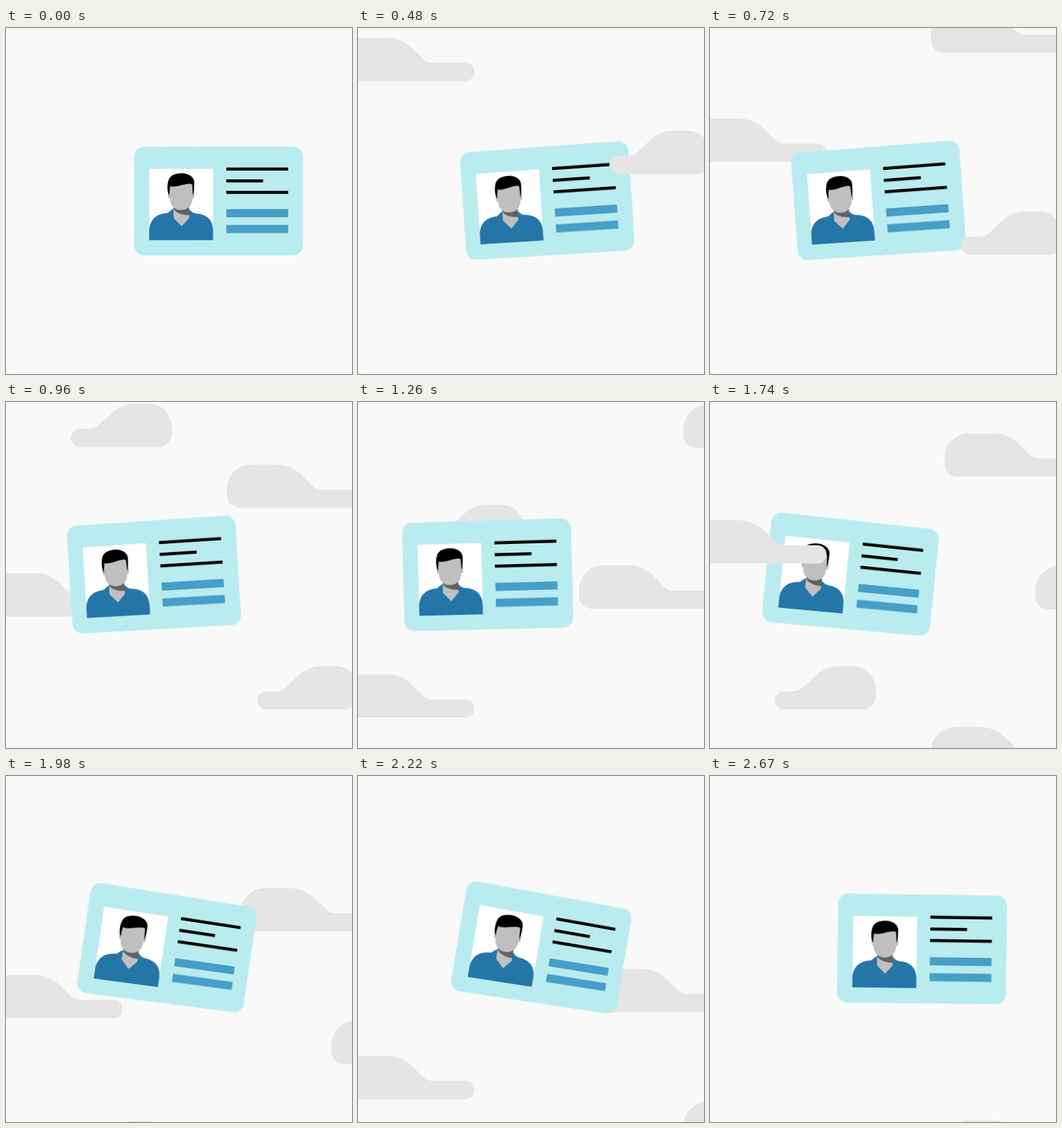
Recreate the animation shown at these times as an HTML page. Size 512x512 px, loop 2700 ms.

```html
<!DOCTYPE html>
<html lang="en">
<head>
<meta charset="utf-8">
<title>Floating ID card</title>
<style>
  html, body { margin: 0; width: 100%; height: 100%; overflow: hidden; background: #f9f9f9; }
  #stage { position: relative; width: 100%; height: 100%; overflow: clip; contain: strict; }
  svg { position: absolute; left: 0; top: 0; width: 100%; height: 100%; }
  #card { transform-origin: 314.5px 256px; }
</style>
</head>
<body>
<div id="stage">
  <svg id="back" viewBox="0 0 512 512" fill="#e5e5e5"></svg>

  <svg id="card" viewBox="0 0 512 512">
    <rect x="189.5" y="175.5" width="250" height="161" rx="15" fill="#b9ecee"/>
    <rect x="212" y="208.5" width="94.5" height="105.5" fill="#fff"/>
    <path fill="#2576a8" d="M212 314V301C212 284 222 275 238 274C242 273 244 268 248 268H271C275 273 278 274 282 274.5C297 276 306.5 284 306.5 300V314Z"/>
    <path fill="#c0c0c0" d="M248 266V281L260 293.5L271 281V266Z"/>
    <path fill="#5f6163" d="M248 263H271V277C262 277 252 274 248 268Z"/>
    <g fill="#bfbfbf">
      <ellipse cx="241.5" cy="247" rx="2" ry="5"/>
      <ellipse cx="277" cy="247" rx="2" ry="5"/>
      <path d="M242.5 228V252C242.5 264 251 269.5 259 269.5S276 264 276 252V228Z"/>
    </g>
    <path d="M241.5 248C239 243 238 235 240 227C242 217 252 215 260 215C272 215 280 222 278.5 231C278.5 238 278 244 276.5 248L275.5 232C274 229 266 231 258 233C250 235 246 235 243 234Z"/>
    <path d="M326 206.5h91.5v4.5h-91.5zM326 224h54.5v4.5h-54.5zM326 241h91.5v4.5h-91.5z"/>
    <path fill="#469fc6" d="M326 268h91.5v12h-91.5zM326 291.5h91.5v12h-91.5z"/>
  </svg>

  <svg id="front" viewBox="0 0 512 512" fill="#e5e5e5"></svg>
</div>

<script>
const LOOP = 2700, TURN = 1400, DRIFT = 127.5, FALL = 0.498;
const byId = id => document.getElementById(id);

const LONG = 'M36 0H72C90 0 102 7 113 18L124 29C130 35 133 37 141 37H189a13.5 13.5 0 0 1 0 27H20C8 64 0 56 0 44V36C0 16 16 0 36 0Z';
const SHORT = 'M13.5 37H25C34 37 37 35 43 30L57 17C67 7 78 0 95 0H116C135 0 149.5 16 149.5 35V43C149.5 55 141 64 129 64H13.5a13.5 13.5 0 0 1 0-27Z';

// layer, shape, x, y at the start of the loop
const clouds = [
  ['back', LONG, -30, -225],
  ['front', SHORT, 372, -87.5],
  ['back', SHORT, 96, -476],
  ['back', LONG, 327, -386],
  ['back', LONG, 481.5, -624],
  ['front', LONG, -30, -692],
  ['back', LONG, 347, -820.5]
].map(([layer, d, x, y]) => {
  const el = document.createElementNS('http://www.w3.org/2000/svg', 'path');
  el.setAttribute('d', d);
  byId(layer).append(el);
  return { el, x, y };
});

// time in ms, tilt in degrees
const tilts = [[0, 0], [480, -3.8], [720, -4.1], [960, -3.5], [1260, -1.5],
               [1740, 5.7], [2220, 9.5], [2670, 0.8], [LOOP, 0]];

const smooth = u => u * u * (3 - 2 * u);
const glide = u => 0.9 * smooth(u) + 0.1 * u;
const secant = i => (tilts[i + 1][1] - tilts[i][1]) / (tilts[i + 1][0] - tilts[i][0]);

function slope(i) {
  if (i === 0) return secant(0);
  if (i === tilts.length - 1) return secant(i - 1);
  const a = secant(i - 1), b = secant(i);
  return a * b > 0 ? 2 * a * b / (a + b) : 0;
}

// Monotone cubic through the tilt keys
function tiltAt(t) {
  const i = tilts.findIndex(key => key[0] > t) - 1;
  const [t0, a] = tilts[i], [t1, b] = tilts[i + 1];
  const span = t1 - t0, u = (t - t0) / span;
  return a + (b - a) * smooth(u)
    + span * u * (1 - u) * (slope(i) * (1 - u) - slope(i + 1) * u);
}

function draw(t) {
  for (const { el, x, y } of clouds) {
    el.setAttribute('transform', `translate(${x} ${y + FALL * t})`);
  }
  const away = t < TURN ? glide(t / TURN) : 1 - glide((t - TURN) / (LOOP - TURN));
  const tilt = tiltAt(t);
  byId('card').style.transform =
    `translateX(${-DRIFT * away}px) perspective(630px) rotateZ(${tilt}deg) rotateY(${tilt * 0.8}deg)`;
}

const start = performance.now();
function tick() {
  draw((performance.now() - start) % LOOP);
  requestAnimationFrame(tick);
}
tick();
</script>
</body>
</html>
```
